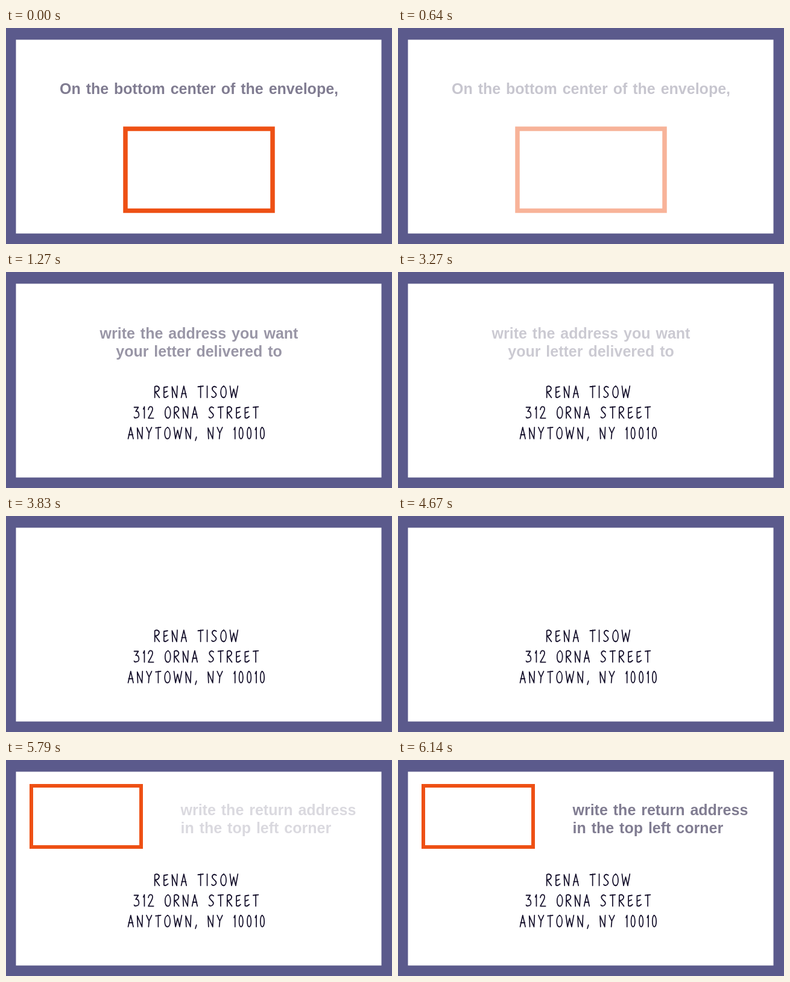
Write an HTML page that moves like this. It is 640x360 px and loops after 8 s.

```html
<!DOCTYPE html>
<html lang="en">
<head>
<meta charset="utf-8">
<title>Addressing an envelope</title>
<style>
  html, body { margin: 0; width: 100%; height: 100%; overflow: hidden; background: #5b5a8c; }
  svg { display: block; width: 100%; height: 100%; }
  text { font: bold 25px "Liberation Sans", Arial, sans-serif; word-spacing: 2px; fill: #807c91; }
  .centered { text-anchor: middle; }
  .frame { fill: none; stroke: #ee5014; }
  .hand { fill: none; stroke: #15102b; stroke-width: 2; stroke-linecap: round; stroke-linejoin: round; }
</style>
</head>
<body>
<svg viewBox="0 0 640 360">
  <rect width="640" height="360" fill="#5b5a8c"/>
  <rect x="16.5" y="19.5" width="606" height="323" fill="#fff"/>

  <g id="intro">
    <text class="centered" x="320" y="110">On the bottom center of the envelope,</text>
    <rect class="frame" x="198" y="168" width="244" height="136.5" stroke-width="7.5"/>
  </g>

  <g id="delivery" class="centered">
    <text x="320" y="111">write the address you want</text>
    <text x="320" y="141">your letter delivered to</text>
  </g>

  <g id="address" class="hand" role="img"></g>

  <path id="returnBox" class="frame" d="M224 43V145H42V43Z" stroke-width="6" pathLength="1"/>
  <g id="returnText">
    <text x="289.5" y="92">write the return address</text>
    <text x="289.5" y="122">in the top left corner</text>
  </g>
</svg>
<script>
const LOOP = 8000, STEP = 70;
const $ = id => document.getElementById(id);

// Handwritten capitals as pen strokes, 20 units tall
const strokes = {
  A: 'M0 20L5 0L10 20M1 13H9',
  E: 'M8 1L1 2V19C4 21 7 19 9 17M1 11L7 9',
  I: 'M0 0V20',
  N: 'M1 20L0 1L9 20L10 0',
  O: 'M6 0C-2 1-2 20 5 20S12 1 5 0',
  R: 'M0 20V1C5-2 10 2 8 6S3 10 1 10L9 20',
  S: 'M9 2C4-2-1 3 2 7S11 13 8 17S1 20 0 18',
  T: 'M0 1L10 0M5 0V20',
  W: 'M0 0L3 20L7 5L11 20L15 0',
  Y: 'M0 0L5 10L10 0M5 10L4 20',
  0: 'M4 0C-1 1-1 20 4 20S9 1 3 0',
  1: 'M0 4L2 0V20',
  2: 'M0 5C1-2 9-2 8 5C7 10 3 14 0 20H10',
  3: 'M0 1H8L3 8C10 7 11 18 6 19S1 20 0 18',
  ',': 'M3 17L1 23'
};
const widths = { E: 9, R: 9, W: 15, I: 1, 0: 8, 1: 2, ',': 3, ' ': 7 };
const GAP = 6.6, SCALE_X = .86, SCALE_Y = .95;

function handwrite(line, centerX, top) {
  const advance = c => (widths[c] ?? 10) * SCALE_X + GAP;
  let x = centerX - [...line].reduce((sum, c) => sum + advance(c), -GAP) / 2;
  let svg = '';
  for (const c of line) {
    if (strokes[c]) {
      svg += `<path d="${strokes[c]}" transform="translate(${x} ${top}) scale(${SCALE_X} ${SCALE_Y})"/>`;
    }
    x += advance(c);
  }
  return svg;
}

const lines = ['RENA TISOW', '312 ORNA STREET', 'ANYTOWN, NY 10010'];
$('address').setAttribute('aria-label', lines.join(', '));
$('address').innerHTML = lines.map((line, i) => handwrite(line, 315.5, 190.3 + i * 34.3)).join('');

// Linear interpolation through [time, value] keys
function track(t, ...keys) {
  if (t <= keys[0][0]) return keys[0][1];
  for (let i = 1; i < keys.length; i++) {
    const [t0, v0] = keys[i - 1], [t1, v1] = keys[i];
    if (t < t1) return v0 + (v1 - v0) * (t - t0) / (t1 - t0);
  }
  return keys.at(-1)[1];
}
const smooth = p => p * p * (3 - 2 * p);
const fade = (id, opacity) => $(id).setAttribute('opacity', opacity);

function render(time) {
  // The motion advances in 70 ms steps, restarting its beat at 3270 ms
  const origin = time < 3270 ? 500 : 3270;
  const t = origin + Math.floor((time - origin) / STEP) * STEP;

  fade('intro', track(t, [430, 1], [640, .43], [850, 0]));
  fade('delivery', track(t, [920, 0], [1270, .8], [3260, .8], [3270, .4], [3480, 0]));
  fade('address', track(t, [920, 0], [1270, 1]));

  const drawn = smooth(track(t, [4670, 0], [5400, 1]));
  $('returnBox').setAttribute('stroke-dasharray', drawn < 1 ? `${drawn} 2` : 'none');
  fade('returnBox', drawn ? track(t, [5230, .76], [5440, 1]) : 0);
  fade('returnText', track(t, [5650, 0], [6140, 1]));
}

const start = performance.now();
function tick() {
  render((performance.now() - start) % LOOP);
  requestAnimationFrame(tick);
}
tick();
</script>
</body>
</html>
```
